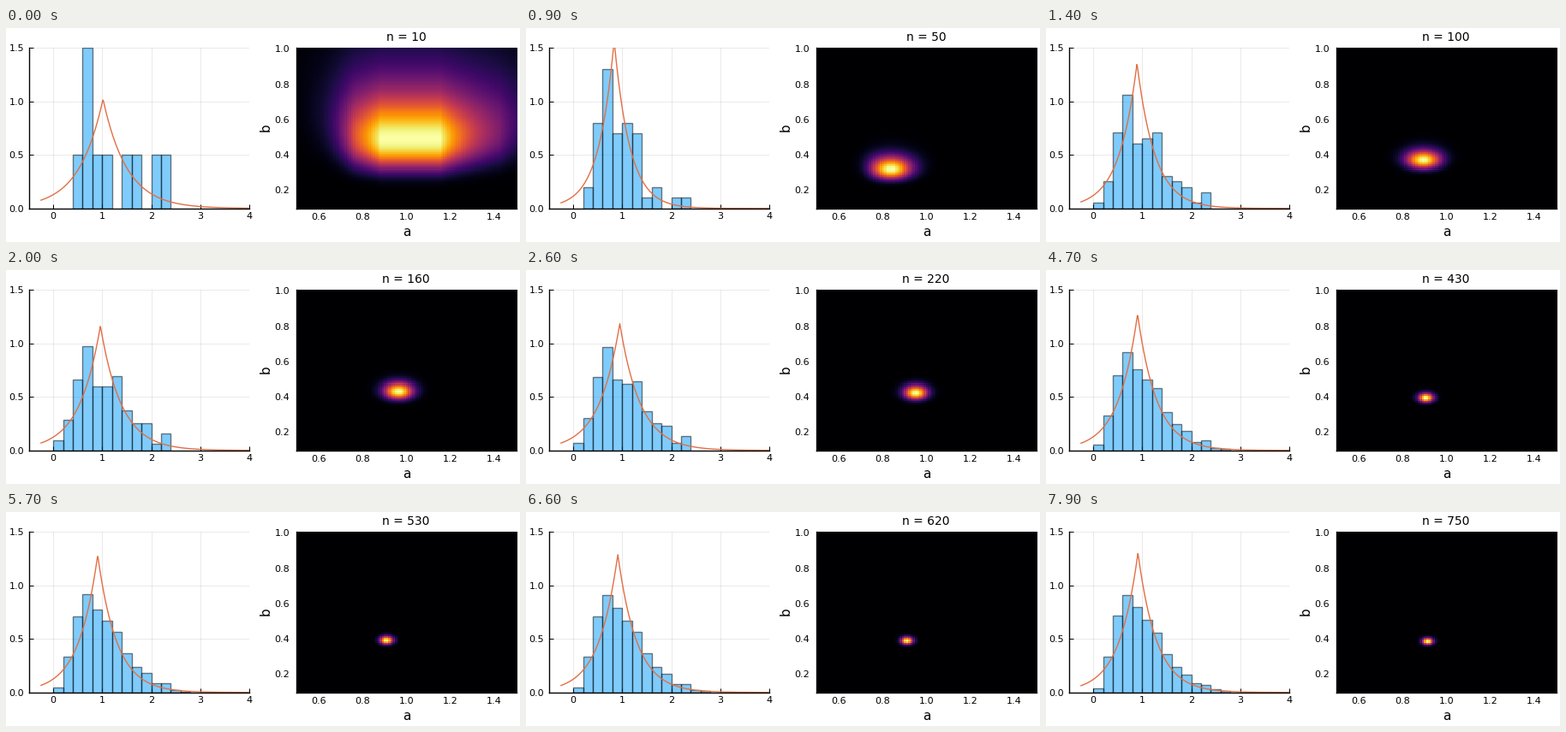
A matplotlib script that plays this animation: 600 by 250 pixels, repeating every 8 s.

```python
import numpy as np
import matplotlib.pyplot as plt
from matplotlib.animation import FuncAnimation
from matplotlib.patches import Rectangle

W, H, DPI = 600, 250, 100
PX = 72 / DPI  # one pixel in points
BIN = 0.2
EDGES = BIN * np.arange(15)

# The first draws of the sample, then bin counts for 50 and 160 draws
FIRST = np.array([0.57, 0.70, 0.75, 0.77, 0.88, 1.15, 1.42, 1.65, 2.10, 2.25])
EARLY = [0, 2, 8, 13, 7, 8, 7, 1, 2, 0, 1, 1, 0, 0]
MIDDLE = [3, 9, 21, 31, 19, 19, 22, 12, 8, 8, 2, 5, 0, 0]

# Later draws follow a gamma law with shape 4 and mean 1
center = EDGES[:-1] + BIN / 2
share = center**3 * np.exp(-4 * center)
share /= share.sum()
COUNT_N = [10, 50, 160, 750]
COUNTS = np.array([np.histogram(FIRST, EDGES)[0], EARLY, MIDDLE,
                   MIDDLE + (750 - 160) * share])

# Fitted location a and scale b at a few sample sizes
mid = np.median(FIRST)
FIT_N = [10, 50, 160, 430, 750]
FIT_A = [mid, 0.835, 0.962, 0.904, 0.912]
FIT_B = [np.abs(FIRST - mid).mean(), 0.319, 0.430, 0.393, 0.384]

A = np.linspace(0.5, 1.5, 101)
B = np.linspace(0.1, 1.0, 91)[:, None]
X = np.linspace(-0.25, 4, 426)


def state(n):
    a = np.interp(n, FIT_N, FIT_A)
    b = np.interp(n, FIT_N, FIT_B)
    counts = [int(round(np.interp(n, COUNT_N, col))) for col in COUNTS.T]
    return a, b, counts


def spread(counts):
    """Points spaced evenly inside each bin."""
    return np.concatenate([lo + BIN * (np.arange(k) + 0.5) / max(k, 1)
                           for lo, k in zip(EDGES, counts)])


def posterior(n, a, b, counts):
    pts = FIRST if n == len(FIRST) else spread(counts)
    pts = pts + a - np.median(pts)
    dev = np.abs(pts[:, None] - A).sum(axis=0)
    total = n * b + dev - np.abs(pts - a).sum()
    logp = -n * np.log(B) - total / B
    return np.exp(logp - logp.max())


def panel(left, top, right, bottom):
    ax = fig.add_axes([left / W, 1 - bottom / H,
                       (right - left) / W, (bottom - top) / H])
    ax.spines[["top", "right"]].set_visible(False)
    for side in ("left", "bottom"):
        ax.spines[side].set_linewidth(1.39 * PX)
    return ax


def label(x, y, text, size, **kw):
    return fig.text(x / W, 1 - y / H, text, size=size, ha="center", **kw)


plt.rcParams["font.family"] = "DejaVu Sans"
fig = plt.figure(figsize=(W / DPI, H / DPI), dpi=DPI, facecolor="white")

# Histogram with the fitted density
hist = panel(26.55, 23, 284, 210.8)
hist.set(xlim=(-0.5, 4), ylim=(0, 1.5), xticks=range(5),
         yticks=[0, 0.5, 1, 1.5])
hist.set_axisbelow(True)
hist.grid(color="black", alpha=0.1, lw=0.8 * PX)
hist.tick_params(direction="in", length=5 * PX, width=PX, labelsize=8)
hist.tick_params(axis="x", pad=4.6 * PX)
hist.tick_params(axis="y", pad=5.2 * PX)
bars = [hist.add_patch(Rectangle((lo, 0), BIN, 0, fc=(0, 0.604, 0.98, 0.5),
                                 ec=(0, 0, 0, 0.5), lw=1.39 * PX))
        for lo in EDGES[:-1]]
curve, = hist.plot([], [], color="#e26f46", lw=1.39 * PX)

# Posterior over location and scale
heat = panel(338.6, 23.3, 596.2, 211)
image = heat.imshow(np.zeros((91, 101)), cmap="inferno", vmin=0, vmax=1,
                    origin="lower", aspect="auto", interpolation="nearest",
                    extent=(0.495, 1.505, 0.095, 1.005))
heat.set(xticks=[0.6, 0.8, 1.0, 1.2, 1.4], yticks=[0.2, 0.4, 0.6, 0.8, 1.0])
heat.tick_params(length=0, labelsize=8)
heat.tick_params(axis="x", pad=4.6 * PX)
heat.tick_params(axis="y", pad=7.6 * PX)
title = label(467, 14.8, "", 10, va="baseline")
label(467.5, 243, "a", 11, va="baseline")
label(303.5, 116.5, "b", 11, va="center", rotation=90)


def update(frame):
    n = 10 * max(1, frame - 4)
    a, b, counts = state(n)
    for bar, k in zip(bars, counts):
        bar.set_height(k / (sum(counts) * BIN))
        bar.set_visible(k > 0)
    curve.set_data(X, np.exp(-np.abs(X - a) / b) / (2 * b))
    image.set_data(posterior(n, a, b, counts))
    title.set_text(f"n = {n}")
    return [*bars, curve, image, title]


anim = FuncAnimation(fig, update, frames=80, interval=100, repeat=True,
                     repeat_delay=0, blit=False)
plt.show()
```
